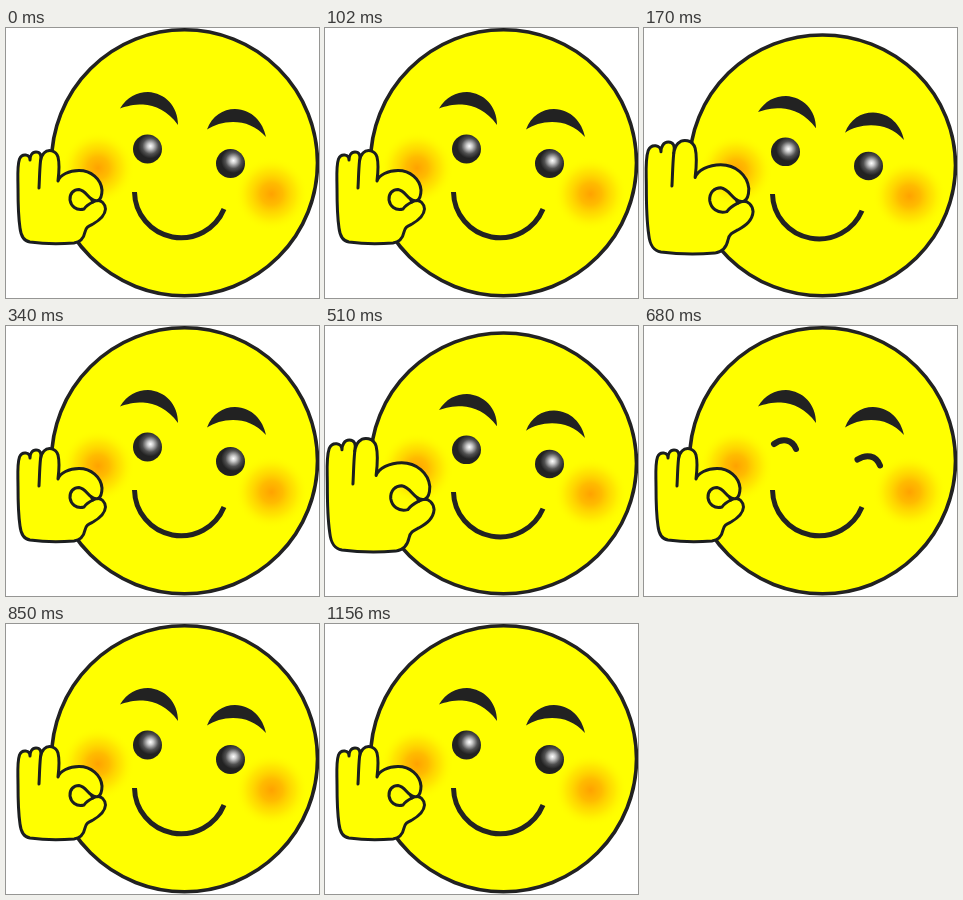
These frames come from a looping animation (313x270 px, 1360 ms). An HTML page:

```html
<!DOCTYPE html>
<html lang="en">
<head>
<meta charset="utf-8">
<title>OK smiley</title>
<style>
html, body { margin: 0; width: 100%; height: 100%; overflow: hidden; background: #fff; }
svg { display: block; width: 313px; height: 270px; }
.line { fill: none; stroke: #222; stroke-linecap: round; stroke-linejoin: round; }
.hand path { fill: #ff0; fill-rule: evenodd; stroke: #1b1e20; stroke-width: 3; stroke-linecap: round; stroke-linejoin: round; vector-effect: non-scaling-stroke; }
.hand .crease { fill: none; }
</style>
</head>
<body>
<svg viewBox="0 0 313 270">
  <defs>
    <radialGradient id="blush">
      <stop offset="0" stop-color="#ffa200"/>
      <stop offset=".3" stop-color="#ffac00" stop-opacity=".82"/>
      <stop offset=".65" stop-color="#ffc400" stop-opacity=".4"/>
      <stop offset="1" stop-color="#ff0" stop-opacity="0"/>
    </radialGradient>
    <radialGradient id="eye" cx=".6" cy=".4" r=".5">
      <stop offset="0" stop-color="#fff"/>
      <stop offset=".2" stop-color="#ccc"/>
      <stop offset=".55" stop-color="#505050"/>
      <stop offset=".85" stop-color="#222"/>
    </radialGradient>
  </defs>
  <g id="head">
    <ellipse cx="178.5" cy="134.8" rx="133" ry="133" fill="#ff0" stroke="#222" stroke-width="3.6"/>
    <circle cx="92" cy="140" r="37" fill="url(#blush)"/>
    <circle cx="265.5" cy="166" r="37" fill="url(#blush)"/>
    <g fill="#222">
      <path d="M114 80.5C121 69 131 64 142 64C159 65 172 78 172 97C162 83 149 77 137 76.5C127 76.5 121 78 114 80.5Z"/>
      <path d="M201 101.5C206 88 217 81 229 81C246 81.5 257 94 260 109C250 98 239 94 227 94C217 94 208 97 201 101.5Z"/>
    </g>
    <path class="line" stroke-width="5" style="stroke-linecap:butt" d="M128.5 164A46.5 46.5 0 0 0 218 181"/>
    <g id="open" fill="url(#eye)">
      <circle cx="141.5" cy="121" r="14.5"/>
      <circle cx="224.5" cy="135.5" r="14.5"/>
    </g>
    <g id="closed" class="line" stroke-width="6">
      <path d="M130 118C138 112 148 113 152 123"/>
      <path d="M213.5 133.5C222 128 232 129 236 139.5"/>
    </g>
  </g>
  <g id="hand" class="hand">
    <path d="M52 153C53 145 54 137 52 129C50 122 42 121 38 125C36 127 35 130 34.5 133C36 127 34 124 30 124C26 124 24 128 24 132C24 126 16 125 13.500 131C11 138 12 150 12 160C12 176 12.500 190 14 200C15 209 18 213 24 214C38 216 55 216 68 215C75 214 78 209 79 204C80 199 83 198 87 196C94 192 99 188 99.500 181C99 175 95 172.500 92 172.500C95 171 96 166 96 162C95 151 85 142.500 73 142.500C63 142.500 54 147 52 153ZM64 172C63.500 165 68 161.500 73 161.500C79 162.500 81 168 85.500 171L87 174C83 176 80 178 78 181C70 183 65 178 64 172Z"/>
    <path class="crease" d="M34.500 133C33.500 143 33.500 152 33 160M85.500 171C88 173 90 173 92 172.500M87 174C89 173 90 172.500 92 172.500"/>
  </g>
</svg>
<script>
const STEP = 170, LOOP = 1360;
const $ = id => document.getElementById(id);

// Scale about a fixed point.
const scaleAt = (x, y, sx, sy) =>
  `translate(${x} ${y}) scale(${sx} ${sy}) translate(${-x} ${-y})`;

function draw(ms) {
  const beat = Math.floor((ms % LOOP) / STEP);
  const push = beat === 1 || beat === 3;
  const wink = beat === 4;
  const grow = push ? 1.22 : 1;
  $("head").setAttribute("transform", scaleAt(0, 270, 1, push ? 0.981 : 1));
  $("hand").setAttribute("transform", scaleAt(56, 169, grow, grow));
  $("open").style.display = wink ? "none" : "";
  $("closed").style.display = wink ? "" : "none";
}

const start = performance.now();
function tick() {
  draw(performance.now() - start);
  requestAnimationFrame(tick);
}
draw(0);
requestAnimationFrame(tick);
</script>
</body>
</html>
```
